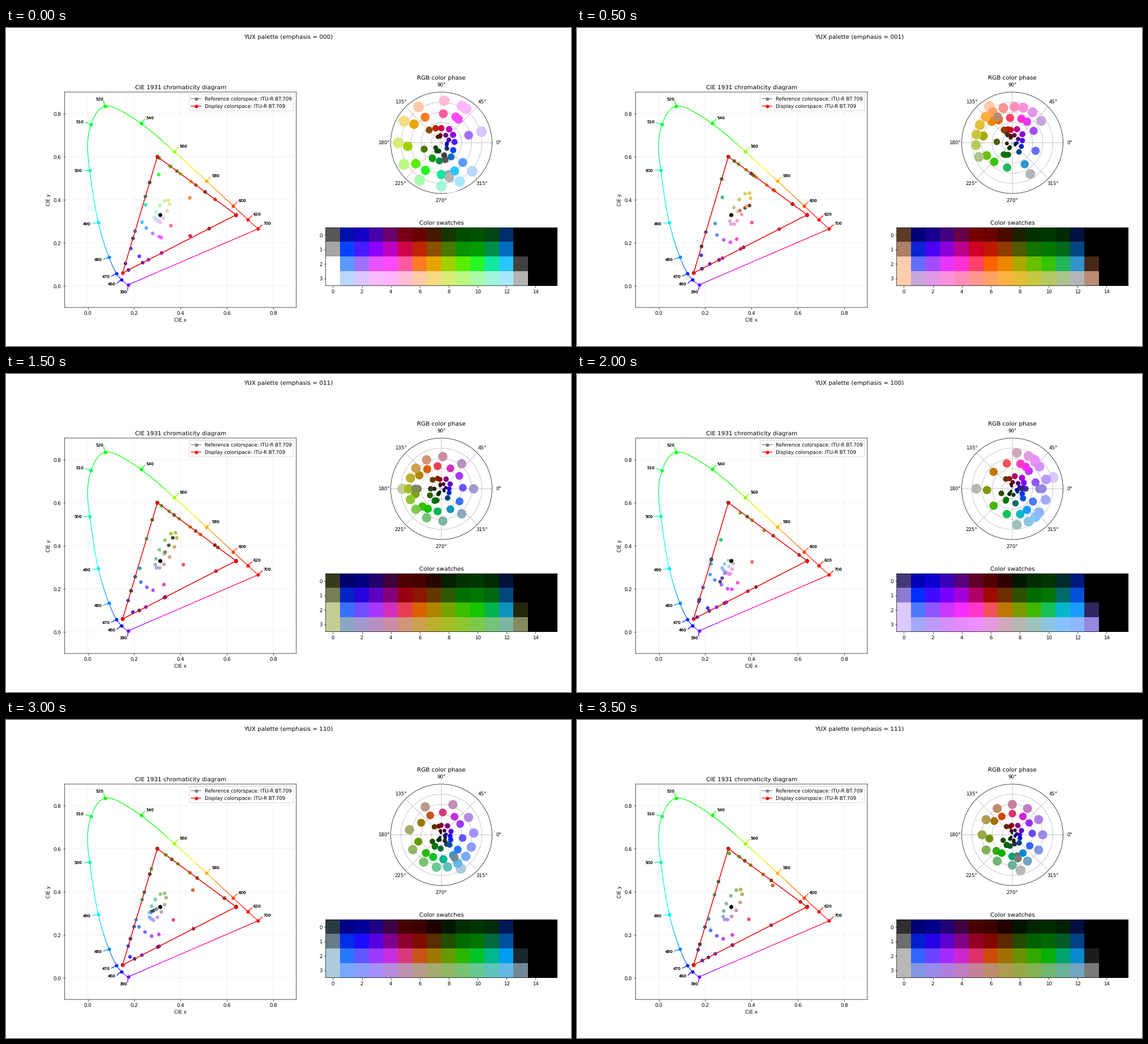
Animation of 998 by 561 pixels, one loop 4000 ms. Source, as a matplotlib script:

```python
import numpy as np
import matplotlib.pyplot as plt
from matplotlib.animation import FuncAnimation
from matplotlib.collections import LineCollection

W, H = 998, 561
DPI = W / 16
plt.rcParams.update({"path.snap": False, "text.hinting": "none"})

# Composite signal per luma row, and the share left under emphasis
HIGH = np.array([.616, .840, 1.100, 1.100])
LOW = np.array([.228, .312, .552, .880])
EMPHASIS_GAIN = .813
BLACK, WHITE, SETUP = .312, 1.100, .067
PHASE = np.radians(15 + 30 * np.arange(12))

PRIMARIES = np.array([(.64, .33), (.30, .60), (.15, .06)])
WHITE_XY = np.array([.3127, .3290])

# Key points of the spectral locus: label, x, y
LOCUS = [("390", .174, .005), ("", .171, .0055), ("", .164, .011),
         ("460", .144, .030), ("470", .124, .058), ("480", .091, .133),
         ("490", .045, .295), ("500", .008, .538), ("510", .014, .750),
         ("520", .074, .834), ("", .155, .806), ("540", .230, .754),
         ("560", .373, .624), ("580", .512, .487), ("600", .627, .372),
         ("620", .691, .308), ("700", .735, .265)]


def with_z(xy):
    return np.column_stack([xy, 1 - xy.sum(axis=1)])


def rgb_matrix():
    """RGB to XYZ, from the primaries and the white point."""
    m = with_z(PRIMARIES).T
    white = with_z(WHITE_XY[None])[0] / WHITE_XY[1]
    return m * np.linalg.solve(m, white)


RGB_TO_XYZ = rgb_matrix()
XYZ_TO_RGB = np.linalg.inv(RGB_TO_XYZ)


def is_high(hue):
    return np.cos(PHASE - np.radians(30 * (hue - 2))) > 0


def decode(signal):
    level = ((signal - BLACK) / (WHITE - BLACK) - SETUP) / (1 - SETUP)
    y = level.mean()
    u = (level * np.cos(PHASE)).sum() / 6
    v = (level * np.sin(PHASE)).sum() / 6
    rgb = (y + 1.13983 * v, y - .39465 * u - .58060 * v, y + 2.03211 * u)
    return np.clip(rgb, 0, 1)


def palette(emphasis):
    gain = np.ones(12)
    for bit, hue in enumerate((12, 4, 8)):
        if emphasis >> bit & 1:
            gain[is_high(hue)] = EMPHASIS_GAIN
    rgb = np.zeros((4, 16, 3))
    for row in range(4):
        for hue in range(14):
            on = np.full(12, hue == 0) if hue in (0, 13) else is_high(hue)
            rgb[row, hue] = decode(gain * np.where(on, HIGH[row], LOW[row]))
    return rgb


def polar_points(rgb):
    r, g, b = rgb.T
    y = .299 * r + .587 * g + .114 * b
    u, v = .492 * (b - y), .877 * (r - y)
    # Greys have no hue; they sit near the bottom of the dial
    grey = np.hypot(u, v) < 1e-6
    theta = np.where(grey, np.radians(-77), np.arctan2(v, u))
    return np.column_stack([theta, y])


def chromaticity(rgb):
    xyz = rgb @ RGB_TO_XYZ.T
    total = xyz.sum(axis=1, keepdims=True)
    lit = total > 1e-9
    return np.where(lit, xyz[:, :2] / np.where(lit, total, 1), WHITE_XY)


def spline(p, samples=30):
    """Natural cubic spline by chord length: curve points and knot tangents."""
    h = np.hypot(*np.diff(p, axis=0).T)
    d = np.diff(p, axis=0) / h[:, None]
    n = len(p)
    a, rhs = np.zeros((n, n)), np.zeros((n, 2))
    a[0, :2], a[-1, -2:] = (2, 1), (1, 2)
    rhs[0], rhs[-1] = 3 * d[0], 3 * d[-1]
    for i in range(1, n - 1):
        a[i, i - 1:i + 2] = h[i], 2 * (h[i - 1] + h[i]), h[i - 1]
        rhs[i] = 3 * (h[i] * d[i - 1] + h[i - 1] * d[i])
    m = np.linalg.solve(a, rhs)
    t = np.linspace(0, 1, samples, endpoint=False)[:, None]
    pieces = [p[i] + t * (p[i + 1] - p[i])
              + h[i] * t * (1 - t) * ((1 - t) * (m[i] - d[i])
                                      - t * (m[i + 1] - d[i]))
              for i in range(n - 1)]
    return np.vstack(pieces + [p[-1:]]), m


def pure_colour(xy):
    lin = np.clip(with_z(xy) @ XYZ_TO_RGB.T, 0, None)
    lin /= lin.max(axis=1, keepdims=True)
    enc = np.where(lin <= .0031308, 12.92 * lin, 1.055 * lin ** (1 / 2.4) - .055)
    return np.clip(enc, 0, 1)


def box(left, top, w, h):
    return [left / W, 1 - (top + h) / H, w / W, h / H]


def coloured_line(ax, xy):
    segments = np.stack([xy[:-1], xy[1:]], axis=1)
    colours = pure_colour((xy[:-1] + xy[1:]) / 2)
    ax.add_collection(LineCollection(segments, colors=colours, lw=1.5, zorder=2))


def draw_locus(ax):
    knots = np.array([key[1:] for key in LOCUS])
    curve, tangents = spline(knots)
    coloured_line(ax, curve)
    coloured_line(ax, np.linspace(curve[0], curve[-1], 60))
    for (label, *_), p, (dx, dy) in zip(LOCUS, knots, tangents):
        if not label:
            continue
        n = np.array([-dy, dx]) / (30 * np.hypot(dx, dy))
        if n @ (p - 1 / 3) < 0:
            n = -n
        colour = pure_colour(p[None])[0]
        ax.plot(*np.transpose([p, p + .75 * n]), color=colour)
        ax.plot(*p, "o", color=colour)
        for _ in range(2):  # doubled for weight
            ax.text(*(p + n), label, size="small", va="center",
                    ha="left" if n[0] >= 0 else "right")


fig = plt.figure(figsize=(W / DPI, H / DPI), dpi=DPI, facecolor="white")
title = fig.suptitle("")

# Chromaticity diagram
cie = fig.add_axes(box(103.7, 113, 409.1, 380))
cie.set_title("CIE 1931 chromaticity diagram")
cie.set(xlabel="CIE x", ylabel="CIE y", xlim=(-.1, .9), ylim=(-.1, .9))
ticks = np.arange(5) / 5
cie.set_xticks(ticks)
cie.set_yticks(ticks)
cie.set_axisbelow(True)
cie.grid(alpha=.25)
draw_locus(cie)
gamut = PRIMARIES[[0, 1, 2, 0]]
for name, colour in (("Reference", "grey"), ("Display", "red")):
    cie.plot(*gamut.T, "o-", color=colour, zorder=3,
             label=f"{name} colorspace: ITU-R BT.709")
cie.legend(loc="upper right")
xy_dots = cie.scatter(np.zeros(64), np.zeros(64), s=40, alpha=.85, zorder=1)

# Hue and luma dial
dial = fig.add_axes(box(679.5, 113, 179, 179), projection="polar")
dial.set_title("RGB color phase")
dial.set_axisbelow(True)
hue_dots = dial.scatter(np.zeros(64), np.zeros(64), lw=0, zorder=3)
dial.set_rlim(0, 1)
dial.set_yticks(ticks[1:])
dial.set_yticklabels([])

# Swatches
grid = fig.add_axes(box(564.6, 352.3, 409.1, 102.3))
grid.set_title("Color swatches")
swatches = grid.pcolormesh(np.arange(17) - .5, np.arange(5) - .5,
                           np.zeros((4, 16, 3)))
grid.set(xlim=(-.5, 15.5), ylim=(3.5, -.5),
         xticks=range(0, 16, 2), yticks=range(4))


def update(emphasis):
    rgb = palette(emphasis)
    flat = rgb.reshape(-1, 3)
    title.set_text(f"YUX palette (emphasis = {emphasis:03b})")
    swatches.set_array(rgb)
    xy_dots.set_offsets(chromaticity(flat))
    xy_dots.set_color(flat)
    lit = flat[flat.max(axis=1) > 0]
    points = polar_points(lit)
    hue_dots.set_offsets(points)
    hue_dots.set_sizes(570 * points[:, 1])
    hue_dots.set_color(lit)
    return title, swatches, xy_dots, hue_dots


anim = FuncAnimation(fig, update, frames=8, interval=500, repeat=True,
                     repeat_delay=0, blit=False)
plt.show()
```
